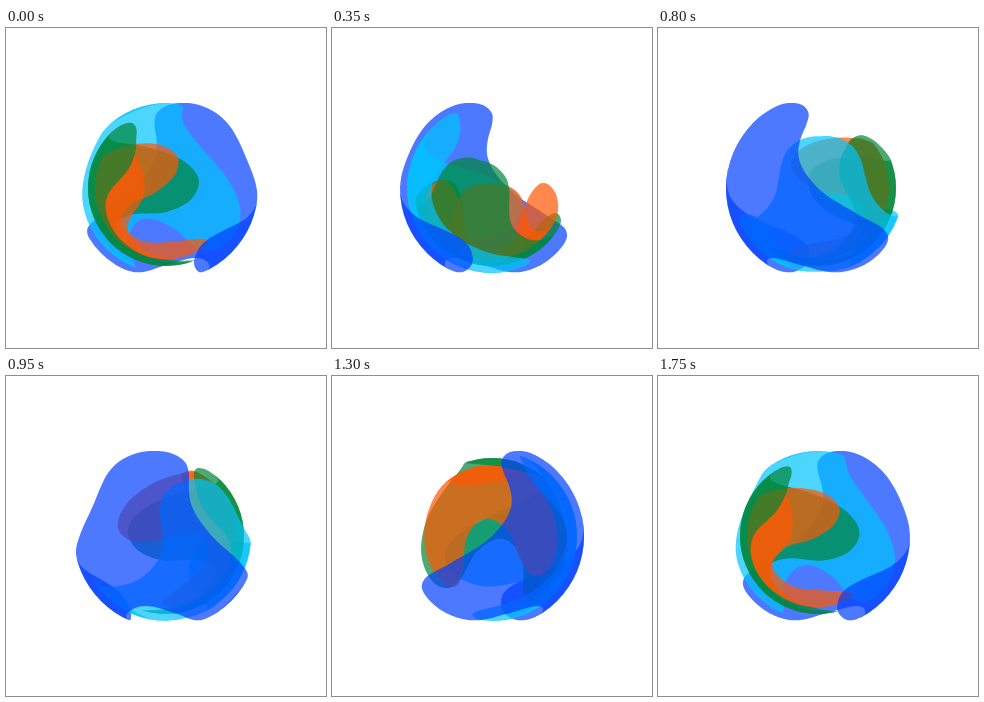
An HTML page with a canvas that plays this animation: 320 px wide and 320 px high, repeating every 1800 ms.

```html
<!DOCTYPE html>
<html lang="en">
<head>
<meta charset="utf-8">
<title>Nested spheres</title>
<style>
html, body { margin: 0; width: 100%; height: 100%; overflow: hidden; background: #fff; }
canvas { display: block; }
</style>
</head>
<body>
<canvas id="stage" width="320" height="320"></canvas>
<script>
const ctx = document.getElementById('stage').getContext('2d');
const LOOP = 1800, STEP = 50, RAD = Math.PI / 180;

// Each sphere wears the same patch; radius, tilt towards the viewer and start angle differ.
const layers = [
  { r: 92, tilt: 0, start: 150, color: '0,65,255' },
  { r: 85, tilt: 30, start: 204, color: '0,195,255' },
  { r: 78, tilt: 48, start: 268, color: '0,135,55' },
  { r: 71, tilt: 64, start: 288, color: '255,88,0' }
];

// Right half of the patch outline as [longitude, latitude], mirrored for the left half.
const half = [
  [0, 67.5], [18, 66.5], [32, 62], [40, 54], [40, 44], [37, 32], [37, 20],
  [43, 8], [56, -5], [80, -18], [104, -27], [118, -35], [122, -44],
  [118, -55], [103, -63], [80, -66.5], [55, -64], [30, -57], [0, -49.5]
];
const knots = half.concat(half.slice(1, -1).reverse().map(([lon, lat]) => [-lon, lat]));

function smooth(points, parts) {
  const n = points.length, out = [];
  for (let i = 0; i < n; i++) {
    const [a, b, c, d] = [-1, 0, 1, 2].map(k => points[(i + k + n) % n]);
    for (let j = 0; j < parts; j++) {
      const u = j / parts;
      out.push([0, 1].map(k => b[k] + u / 2 * (c[k] - a[k] +
        u * (2 * a[k] - 5 * b[k] + 4 * c[k] - d[k] +
        u * (3 * (b[k] - c[k]) + d[k] - a[k])))));
    }
  }
  return out;
}

const outline = smooth(knots, 8);
const flat = new Path2D();
outline.forEach(([lon, lat]) => flat.lineTo(lon, lat));
flat.closePath();

function project([lon, lat], spin, tilt, r) {
  const l = (lon + spin) * RAD, f = lat * RAD, p = tilt * RAD;
  const y = Math.sin(f), z = Math.cos(f) * Math.cos(l);
  return [
    r * Math.cos(f) * Math.sin(l),
    r * (z * Math.sin(p) - y * Math.cos(p)),
    y * Math.sin(p) + z * Math.cos(p)
  ];
}

function disc(r) {
  const path = new Path2D();
  path.arc(0, 0, r, 0, 2 * Math.PI);
  return path;
}

// Draws the part of a patch on one hemisphere; side is 1 for front, -1 for back.
function drawSide({ r, tilt, start, color }, turn, side) {
  const spin = start + turn, far = 1.5 * r, path = new Path2D();
  let last = null;
  for (const point of outline.concat([outline[0]])) {
    const [x, y, z] = project(point, spin, tilt, r);
    if (z * side >= 0) {
      if (last !== null) path.lineTo(r * Math.cos(last), r * Math.sin(last));
      path.lineTo(x, y);
      last = null;
      continue;
    }
    // Hidden points travel outside the rim, where the clip removes them.
    const angle = Math.atan2(y, x);
    if (last === null) {
      path.lineTo(r * Math.cos(angle), r * Math.sin(angle));
      path.lineTo(far * Math.cos(angle), far * Math.sin(angle));
    } else {
      path.arc(0, 0, far, last, angle, Math.sin(angle - last) < 0);
    }
    last = angle;
  }
  path.closePath();

  // A patch around the hidden pole is the outside of its outline.
  const lon = (side > 0 ? 180 : 0) - spin;
  const wrapped = ((lon + 180) % 360 + 360) % 360 - 180;
  ctx.save();
  ctx.setTransform(1, 0, 0, 1, 0, 0);
  const inverted = ctx.isPointInPath(flat, wrapped, -side * tilt);
  ctx.restore();
  if (inverted) path.addPath(disc(far));

  ctx.save();
  ctx.clip(disc(r));
  ctx.fillStyle = `rgba(${color},.7)`;
  ctx.fill(path, 'evenodd');
  ctx.restore();
}

function draw(now) {
  const t = Math.floor(now % LOOP / STEP) * STEP;
  const turn = t / LOOP * 360;
  ctx.setTransform(1, 0, 0, 1, 0, 0);
  ctx.fillStyle = '#fff';
  ctx.fillRect(0, 0, 320, 320);
  ctx.translate(160, 160);
  for (const layer of layers) drawSide(layer, turn, -1);
  for (const layer of [...layers].reverse()) drawSide(layer, turn, 1);
}

let begin = null;
function frame(now) {
  begin ??= now;
  draw(now - begin);
  requestAnimationFrame(frame);
}
draw(0);
requestAnimationFrame(frame);
</script>
</body>
</html>
```
